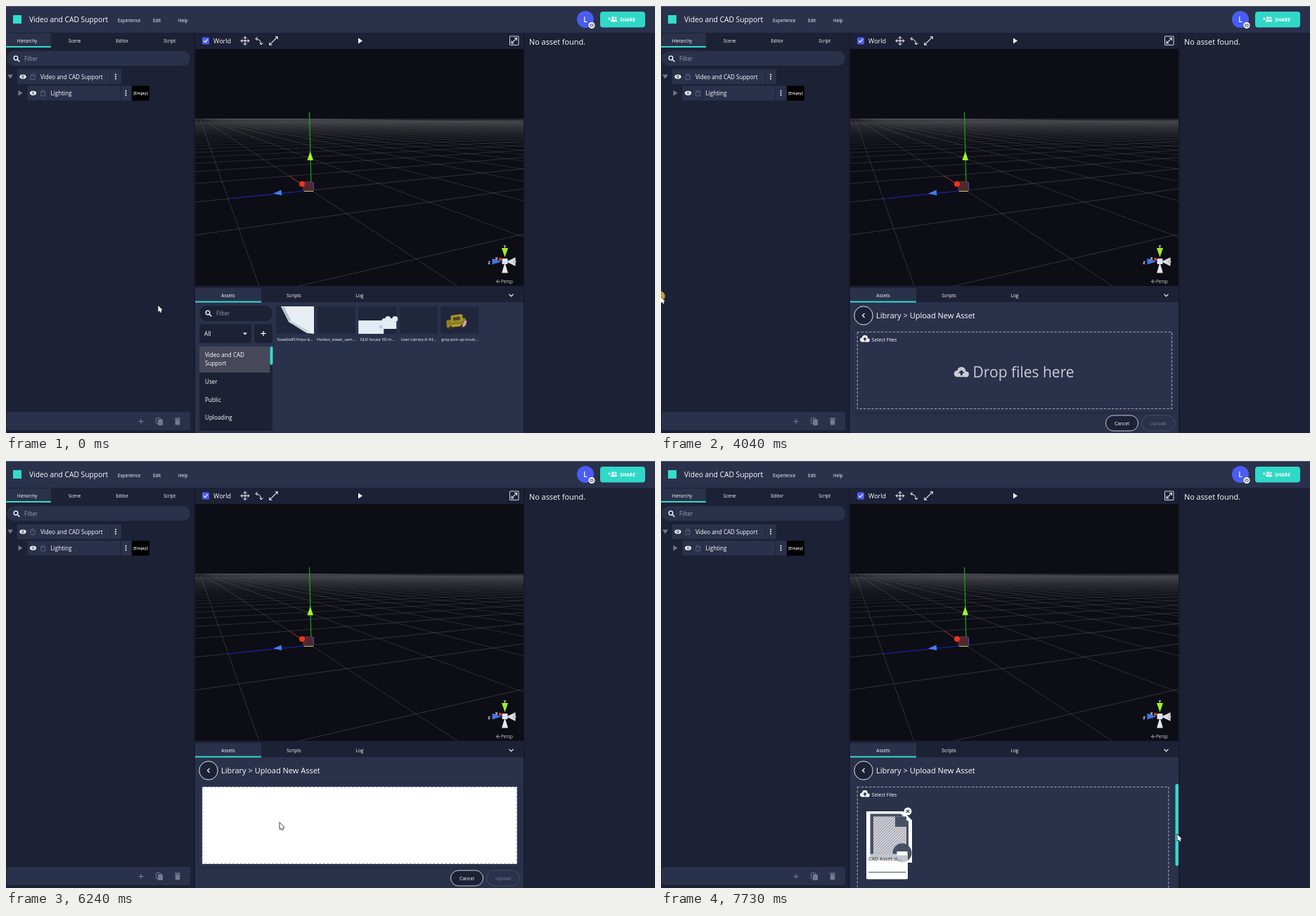
Animation, 923 px wide and 607 px high, one loop 8 s. Source, as an HTML page with a canvas:

```html
<!DOCTYPE html>
<html lang="en">
<head>
<meta charset="utf-8">
<title>Asset upload</title>
<style>
  html, body { margin: 0; width: 100%; height: 100%; overflow: hidden; background: #1c2136; }
  canvas { display: block; width: 923px; height: 607px; }
</style>
</head>
<body>
<canvas id="stage" width="923" height="607"></canvas>
<script>
const ctx = document.getElementById('stage').getContext('2d');
const LOOP = 8000, STEP = 78.3;
const DARK = '#1c2136', PANEL = '#2a314b', TEAL = '#33dccb', BLUE = '#4a5df2';
const WHITE = '#fff', DIM = '#747a8e', SOFT = '#cbcdd5', INK = '#465062';
const UP = -Math.PI / 2, DOWN = Math.PI / 2, LEFT = Math.PI, RIGHT = 0;

// Drawing helpers
function at(x, y, draw, angle = 0) {
  ctx.save(); ctx.translate(x, y); ctx.rotate(angle); draw(); ctx.restore();
}
function paint(fill, stroke, width = 1) {
  if (fill) { ctx.fillStyle = fill; ctx.fill(); }
  if (stroke) { ctx.strokeStyle = stroke; ctx.lineWidth = width; ctx.stroke(); }
}
function rect(x, y, w, h, fill) { ctx.fillStyle = fill; ctx.fillRect(x, y, w, h); }
function box(x, y, w, h, r, fill, stroke, width) {
  ctx.beginPath(); ctx.roundRect(x, y, w, h, r); paint(fill, stroke, width);
}
function circle(x, y, r, fill, stroke, width) {
  ctx.beginPath(); ctx.arc(x, y, r, 0, Math.PI * 2); paint(fill, stroke, width);
}
function trace(...pts) {
  ctx.beginPath();
  for (let i = 0; i < pts.length; i += 2) ctx.lineTo(pts[i], pts[i + 1]);
}
function line(x1, y1, x2, y2, color = WHITE, width = 1) { trace(x1, y1, x2, y2); paint(null, color, width); }
function tri(x, y, len, half, angle, fill) {
  at(x, y, () => { trace(len, 0, -len, half, -len, -half); paint(fill); }, angle);
}
function chevron(x, y, r, angle, color = WHITE, width = 1.2) {
  at(x, y, () => { trace(-r, -r, 0, 0, -r, r); paint(null, color, width); }, angle);
}
function sheet(x, y, w, h, cut, fill) {
  trace(x, y, x + w - cut, y, x + w, y + cut, x + w, y + h, x, y + h);
  paint(fill);
}
function text(s, x, y, size, color = WHITE, align = 'left', weight = 500) {
  ctx.font = `${weight} ${size}px "Open Sans", "Noto Sans", sans-serif`;
  ctx.textAlign = align;
  ctx.fillStyle = color;
  ctx.fillText(s, x, y);
}

// Icons
function cross(x, y, r, color = WHITE, angle = 0) {
  at(x, y, () => { line(-r, 0, r, 0, color, 1.2); line(0, -r, 0, r, color, 1.2); }, angle);
}
function search(x, y) {
  circle(x - 1, y - 1, 2.8, null, WHITE, 1.3);
  line(x + 1, y + 1, x + 4.3, y + 4.3, WHITE, 1.5);
}
function dots(x, y) { for (const d of [-3, 0, 3]) circle(x, y + d, 1, WHITE); }
function eye(x, y) {
  ctx.beginPath(); ctx.ellipse(x, y, 4.6, 3.1, 0, 0, 7); paint(WHITE);
  circle(x, y, 1.9, PANEL); circle(x, y, 1.1, WHITE);
}
function lock(x, y) {
  box(x - 2.5, y - 4, 5, 5, 2.5, null, '#5d6378');
  box(x - 3, y - 1.5, 6, 5.5, 0.5, PANEL, '#5d6378');
}
function cloud(x, y, s, color) {
  at(x, y, () => {
    ctx.scale(s, s);
    circle(0, -1, 4, color); circle(-4, 1.5, 3, color); circle(4.4, 2, 2.6, color);
    rect(-4, 0, 8.4, 4.5, color);
    tri(0, -0.6, 1.6, 3, UP, PANEL);
    rect(-1, 0.8, 2, 2.2, PANEL);
  });
}
function stretch(x, y, len, angle) {
  at(x, y, () => {
    line(-len, 0, len, 0);
    chevron(len, 0, 2.4, RIGHT, WHITE, 1); chevron(-len, 0, 2.4, LEFT, WHITE, 1);
  }, angle);
}

function header() {
  rect(0, 0, 923, 38, PANEL);
  rect(0, 0, 923, 1, '#565d73');
  rect(10, 13, 12, 12, TEAL);
  text('Video and CAD Support', 33, 23, 10.25);
  text('Experience', 159, 22.5, 6.3);
  text('Edit', 209, 22.5, 6.3);
  text('Help', 245, 22.5, 6.3);
  circle(824, 19, 12, BLUE);
  text('L', 824, 23, 10, WHITE, 'center', 600);
  circle(833, 27.5, 4.5, WHITE);
  box(830.8, 26, 4.4, 3, 0.8, null, PANEL);
  box(845, 8, 64, 22.5, 4, '#30d8c8');
  for (const [x, s] of [[863, 1], [867, 0.75]]) {
    circle(x, 17, 1.9 * s, WHITE);
    box(x - 3 * s, 19.6, 6 * s, 2.6, 1, WHITE);
  }
  cross(858, 18, 1.8);
  text('SHARE', 873, 22.2, 6.9, WHITE, 'left', 700);
}

// One row of the hierarchy, indented by depth
function row(label, depth, width) {
  const x = depth * 14.5, y = 90 + depth * 23.3, mid = y + 10.5;
  tri(6 + x, mid, 3, 4, depth ? RIGHT : DOWN, DIM);
  box(16 + x, y, width, 21, 1, PANEL);
  rect(45 + x, y, 1, 21, '#232940');
  rect(width + x, y, 1, 21, DARK);
  eye(24 + x, mid); lock(38 + x, mid); dots(width + 8 + x, mid);
  text(label, 49 + x, mid + 3, 8.1);
}

function tree() {
  rect(0, 39, 64, 20, PANEL);
  rect(0, 57, 64, 2, TEAL);
  ['Hierarchy', 'Scene', 'Editor', 'Script'].forEach((s, i) => text(s, 30 + i * 67.6, 51.5, 6.4, WHITE, 'center'));
  box(1, 64, 261, 21, 10.5, PANEL);
  search(15, 75);
  text('Filter', 26, 78, 8.1, '#9a9fb0', 'left', 400);
  row('Video and CAD Support', 0, 148);
  row('Lighting', 1, 148);
  rect(179, 113.5, 25, 21, '#000');
  text('[Empty]', 191.5, 126.3, 5.5, WHITE, 'center', 600);

  box(1, 577, 261, 26, 3, PANEL);
  cross(192, 590.5, 3.6, DIM);
  box(213.5, 585.5, 6, 8, 1, null, DIM);
  box(216, 587.5, 7, 8.5, 1, DIM);
  rect(240, 585.5, 8, 1.4, DIM);
  box(240.7, 587.5, 6.6, 8, 1, DIM);
}

function toolbar() {
  for (const x of [267, 736]) rect(x, 38, 2, 569, '#171b2d');
  box(279, 44.5, 10, 10, 1.5, BLUE);
  line(281.3, 49.4, 283.3, 51.6, WHITE, 1.3);
  line(283.3, 51.6, 287, 47.2, WHITE, 1.3);
  text('World', 295, 52.7, 9);
  stretch(340, 49.5, 6, RIGHT);
  stretch(340, 49.5, 6, DOWN);
  ctx.beginPath(); ctx.arc(355, 54.5, 8, UP, 0); paint(null, WHITE);
  chevron(355, 46.5, 2.5, LEFT, WHITE, 1);
  chevron(363, 55, 2.5, DOWN, WHITE, 1);
  stretch(380.5, 49.5, 8, UP / 2);
  tri(504, 49.5, 3, 4, RIGHT, WHITE);
  box(716.5, 43, 12.5, 12.5, 0.5, null, '#d8dae2');
  stretch(722.7, 49.2, 5.2, UP / 2);
  text('No asset found.', 744, 55, 10.9);
}

// Ground plane: a runs toward one vanishing point, b toward the other
const ORIGIN = [434, 262], FAR_A = [275, 158], FAR_B = [1457, 158];
function ground(a, b) {
  const u = a * 0.242, v = b * 0.1034;
  return ORIGIN.map((o, i) => (o + FAR_A[i] * u + FAR_B[i] * v) / (1 + u + v));
}

function grid() {
  ctx.save();
  ctx.beginPath(); ctx.rect(269, 160, 467, 238); ctx.clip();
  const fog = ctx.createLinearGradient(0, 160, 0, 188);
  fog.addColorStop(0, 'rgba(42,42,46,.85)');
  fog.addColorStop(1, 'rgba(30,30,34,0)');
  rect(269, 160, 467, 28, fog);
  for (let i = -3; i < 60; i++) {
    const shade = `rgba(100,100,106,${0.5 / (1 + Math.max(0, i) * 0.1)})`;
    for (const [far, p] of [[FAR_B, ground(i, 0)], [FAR_A, ground(0, i)]]) {
      const [dx, dy] = [p[0] - far[0], p[1] - far[1]];
      line(...far, far[0] + dx * 9, far[1] + dy * 9, shade, 0.85);
    }
  }
  ctx.restore();
}

function viewport() {
  rect(269, 61, 467, 337, '#0d0e15');
  grid();
  line(...ground(1, 0), ...ORIGIN, '#a52525');
  line(...ground(0, -1), ...ORIGIN, '#1818b4');
  line(431.5, 151, 434, 256, '#0fae18', 1.2);
  box(423, 250, 14.5, 13, 2, '#50282e', '#6d3c50');
  line(437.5, 251, 437.5, 262, '#3050d8');
  line(424, 263.5, 437, 263.5, '#a5c840');
  circle(421, 253, 4, '#f2321c');
  tri(432.7, 213, 6.3, 4.3, UP, '#a3f52c');
  tri(386, 266, 6, 3.8, Math.PI - 0.1, '#3e7df2');

  tri(718, 363.5, 6.5, 6.2, LEFT, '#dcdde2');
  circle(723, 363.5, 2.4, '#c4c5cc');
  tri(709.5, 372, 7.5, 4.4, UP, '#e6e7ea');
  tri(698, 363.2, 6.5, 4.4, RIGHT, '#3b78f0');
  tri(709.5, 350.5, 6.5, 4.6, DOWN, '#9cee2b');
  circle(703, 360, 2.2, '#d93a30');
  box(705.5, 359, 8, 8, 1, '#dbe3f6');
  [['Y', 709.5, 344], ['X', 697.5, 361], ['Z', 687, 366.5]].forEach(([s, x, y]) => text(s, x, y, 5.5, WHITE, 'center', 700));
  chevron(697.5, 391.7, 2.8, LEFT, SOFT, 0.8);
  line(697.5, 391.7, 703, 391.7, SOFT, 0.8);
  text('Persp', 704, 394, 6.4, '#d5d7de', 'left', 400);
}

function panelTabs() {
  rect(269, 398, 467, 23, DARK);
  rect(269, 421, 467, 186, PANEL);
  rect(269, 401, 94, 20, PANEL);
  rect(269, 419.5, 94, 2, TEAL);
  ['Assets', 'Scripts', 'Log'].forEach((s, i) => text(s, 316 + i * 93.5, 414, 6.5, WHITE, 'center'));
  chevron(718.5, 412.7, 3, DOWN);
}

// Simple models shown inside the 54 x 39 previews
const models = {
  0() {
    trace(7, 0, 54, 0, 54, 39, 44, 38, 18, 22); paint('#e6eef3');
    line(10, 1, 20, 21, '#aebfc8', 3);
    line(20, 22, 46, 36, '#bccbd3', 2);
  },
  2() {
    const wall = '#e2ecf5';
    rect(0, 20, 36, 19, wall);
    rect(34, 22, 20, 10, wall);
    for (let i = 0; i < 4; i++) circle(37 + i * 5, 21 - (i % 2) * 3, 4, wall);
    circle(32, 29, 2.5, '#bccbdb');
  },
  4() {
    at(22, 23, () => {
      box(-14, -5, 28, 11, 2, '#8f7f24');
      box(-7, -11, 17, 10, 2, '#a8952a');
      box(-4, -8, 10, 5, 1, '#4f4719');
      line(-13, 4, 12, 4, '#c9b53a', 1.5);
      for (const x of [-9, 8]) circle(x, 6, 2.6, '#3f3818');
      line(9, 7, 14, -1, '#e0a4c2', 3);
    }, -0.12);
  },
};

function thumbs() {
  ['5oae0o857myo-b...', 'Harbor_tower_sam...', 'OLD house 3D m...', 'User Library-A-54...', 'gray-pick-up-truck...'].forEach((s, i) => {
    const x = 384 + i * 58.6;
    rect(x, 427, 54, 39, '#20263c');
    if (models[i]) at(x, 427, models[i]);
    text(s, x + 27, 475.5, 5.7, WHITE, 'center');
  });
}

function library(t, hover) {
  box(275, 426, 104, 22, 11, DARK);
  search(288, 437);
  text('Filter', 299, 440.2, 8.1, '#9a9fb0', 'left', 400);
  box(275, 452, 74, 27, 4, DARK);
  text('All', 282, 468.7, 8.2);
  tri(340, 466, 1.5, 3, DOWN, WHITE);
  box(353, 452, 26, 27, 4, hover ? '#292d41' : DARK);
  if (t >= 1630) circle(366, 465.5, 4 + 4 * progress(t, 1630, 1790), '#5d606e');
  cross(366, 465.5, 3.6);

  box(275, 484, 104, 120, 3, DARK);
  rect(275, 484, 100.5, 37, '#464859');
  box(375.5, 484, 4, 26, 2, TEAL);
  text('Video and CAD', 283, 499, 8.1);
  text('Support', 283, 511, 8.1);
  ['User', 'Public', 'Uploading'].forEach((s, i) => text(s, 283, 537 + i * 25.7, 8.1));
  thumbs();
}

function dashed(w, h) {
  ctx.setLineDash([3.4, 2.2]);
  box(279.3, 463.5, w, h, 0, null, '#a0a4b3', 1.1);
  ctx.setLineDash([]);
}

function uploadHead() {
  circle(288, 440, 13.2, DARK, '#e2e4ea');
  chevron(286.5, 440, 3, LEFT);
  text('Library > Upload New Asset', 306, 444, 11);
}

function selectFiles() {
  cloud(290, 473, 0.98, WHITE);
  text('Select Files', 299.5, 476.6, 7.1);
}

function dropZone(white) {
  ctx.save();
  ctx.shadowColor = 'rgba(0,0,0,.28)'; ctx.shadowBlur = 4; ctx.shadowOffsetY = 1;
  box(274, 459, 457, 118, 3, PANEL);
  ctx.restore();
  selectFiles();
  cloud(427.3, 520.5, 1.5, SOFT);
  text('Drop files here', 443.5, 527.5, 21, SOFT, 'left', 400);
  rect(279, 463, 448, 110, `rgba(255,255,255,${white})`);
  dashed(447.2, 109);
  box(632.5, 582, 46, 22, 11, DARK, '#c9ccd6');
  text('Cancel', 655.5, 595.5, 6.8, WHITE, 'center');
  box(683.5, 582, 47, 22, 11, PANEL, '#444b63');
  text('Upload', 707, 595.5, 6.6, '#767c90', 'center');
}

function fileCard(alpha) {
  box(292, 540, 59, 54.5, 2, WHITE);
  sheet(292, 498, 65, 73, 13, WHITE);
  sheet(297.5, 501.5, 54.5, 65, 11, INK);
  sheet(344, 498, 13, 13, 13, WHITE);
  ctx.save();
  ctx.beginPath(); ctx.rect(302, 505.5, 47, 53); ctx.clip();
  rect(302, 505, 47, 54, '#dcdce3');
  for (let d = 0; d < 108; d += 4) line(302, 505 + d, 350, 457 + d, '#a5a5b2', 1.5);
  rect(333, 505, 16, 15, INK);
  ctx.restore();
  circle(343, 557, 13.5, INK);
  rect(335.5, 555, 15, 5.5, WHITE);
  rect(293, 558.5, 58, 12.5, 'rgba(255,255,255,.68)');
  rect(292, 571, 59, 23, WHITE);
  text('CAD Asset.sl...', 295, 568, 7, '#4c5361', 'left', 600);
  line(295, 584.5, 348, 584.5, INK);
  circle(351, 498, 5.5, WHITE);
  cross(351, 498, 3, '#2c3244', Math.PI / 4);
  // Veil the whole card with the panel colour to fade it as a group
  ctx.globalAlpha = 1 - alpha;
  rect(290, 491, 69, 105, PANEL);
  ctx.globalAlpha = 1;
}

function fileList(t) {
  dashed(442.5, 200);
  selectFiles();
  fileCard(1 - (1 - progress(t, 6320, 7020)) ** 1.5);
  box(731.5, 459, 4.5, 116.5, 2, TEAL);
}

// Motion advances in even steps, as a screen recording does
function progress(t, start, end) {
  if (t < start) return 0;
  const n = Math.round((end - start) / STEP);
  return Math.min(1, (Math.floor((t - start) / (end - start) * n + 0.02) + 1) / (n + 1));
}
const ease = p => p < 0.5 ? 2 * p * p : 1 - 2 * (1 - p) ** 2;

// Pointer key points: start, end, x, y
const MOVES = [
  [460, 1090, 364, 474],
  [2260, 2640, -7, 411],
  [4040, 4820, 368, 513],
  [4900, 5210, 389, 513.5],
  [6710, 7020, 704, 521],
  [7110, 7190, 748, 521],
  [7420, 7730, 734, 530],
];

function pointerAt(t) {
  return MOVES.reduce(([x, y], [start, end, tx, ty]) => {
    const p = ease(progress(t, start, end));
    return [x + (tx - x) * p, y + (ty - y) * p];
  }, [216, 425]);
}

function arrow() {
  line(2.5, 6, 4.8, 11, '#111', 3);
  trace(0, 0, 0, 10, 7, 7.2); ctx.closePath(); paint(WHITE, '#111', 0.8);
  line(2.5, 5.5, 4.6, 10.6, WHITE, 1.6);
}

function hand() {
  for (const edge of ['#111', null]) {
    box(-1, 0, 2.2, 8, 1, WHITE, edge, 1.6);
    box(-2.8, 5, 8, 7.5, 2, WHITE, edge, 1.6);
  }
}

function dragImage(alpha) {
  ctx.globalAlpha = alpha;
  const g = ctx.createLinearGradient(0, 459, 0, 520);
  g.addColorStop(0, 'rgba(176,178,184,.56)');
  g.addColorStop(1, 'rgba(168,172,184,.46)');
  rect(358.5, 459.5, 60.5, 60.5, g);
  rect(358.5, 514, 60.5, 5, 'rgba(62,78,118,.55)');
  ctx.globalAlpha = 1;
}

function draw(t) {
  const during = (a, b) => t >= a && t < b;
  const [x, y] = pointerAt(t);
  const onAdd = t < 1870 && Math.abs(x - 366) < 13 && Math.abs(y - 465.5) < 13.5;
  rect(0, 0, 923, 607, DARK);
  header();
  tree();
  toolbar();
  viewport();
  panelTabs();
  if (t < 1870) {
    library(t, onAdd);
  } else {
    uploadHead();
    if (t < 6318) dropZone(progress(t, 5530, 5780));
    else fileList(t);
  }
  if (during(4900, 6240)) dragImage(progress(t, 4900, 5210));
  if (during(5450, 5530)) {
    circle(401, 526.5, 4, '#d9c3c3', '#a9686c', 1.3);
    line(398.5, 524, 403.5, 529, '#a9686c', 1.3);
  }
  if (during(1470, 1630) || during(4040, 6080)) circle(x - 0.5, y - 0.2, 7, 'rgba(200,190,48,.88)');
  if (!during(2640, 4040)) at(x, y, onAdd ? hand : arrow);
}

const begin = performance.now();
function tick() {
  draw((performance.now() - begin) % LOOP);
  requestAnimationFrame(tick);
}
tick();
</script>
</body>
</html>
```
